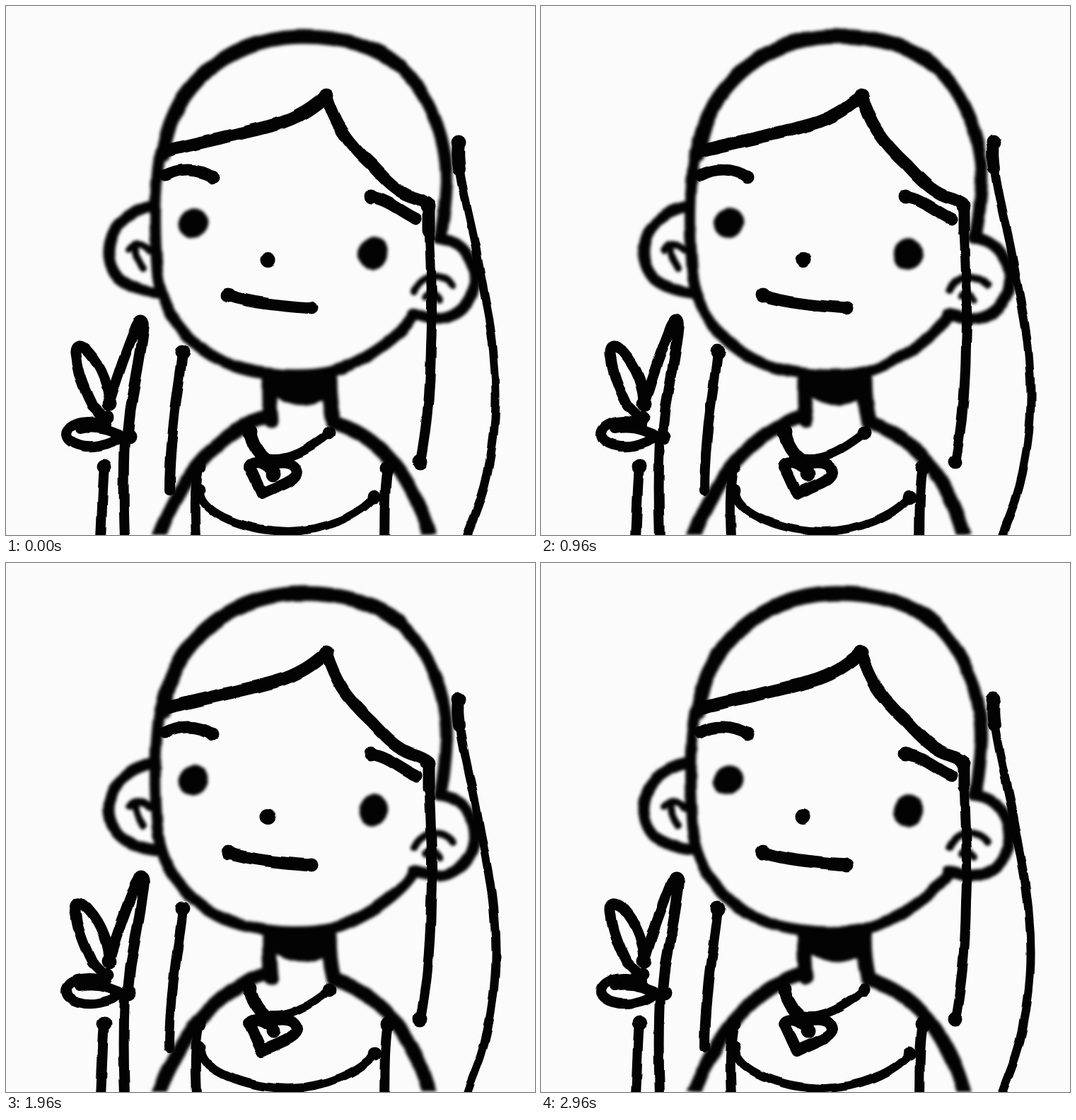
An HTML page that plays this animation: 748 px wide and 748 px high, repeating every 3000 ms.

```html
<!DOCTYPE html>
<html lang="en">
<head>
<meta charset="utf-8">
<title>Boiling line portrait</title>
<style>
  html, body { margin: 0; height: 100%; overflow: hidden; background: #fbfbfb; }
  svg { display: block; width: 100vw; height: 100vh; }
  g { fill: none; stroke: #030303; stroke-linecap: round; stroke-linejoin: round; }
  .solid { fill: #030303; }
</style>
</head>
<body>
<svg viewBox="0 0 748 748">
  <defs>
    <filter id="soft" filterUnits="userSpaceOnUse" x="0" y="0" width="748" height="748" color-interpolation-filters="sRGB">
      <feTurbulence type="fractalNoise" baseFrequency=".035" numOctaves="1"/>
      <feDisplacementMap in="SourceGraphic" scale="6" xChannelSelector="R" yChannelSelector="G"/>
      <feGaussianBlur stdDeviation="2.1"/>
    </filter>
    <filter id="crisp" filterUnits="userSpaceOnUse" x="0" y="0" width="748" height="748" color-interpolation-filters="sRGB">
      <feTurbulence type="fractalNoise" baseFrequency=".035" numOctaves="1"/>
      <feDisplacementMap in="SourceGraphic" scale="6" xChannelSelector="R" yChannelSelector="G"/>
      <feGaussianBlur stdDeviation=".7"/>
    </filter>
  </defs>

  <g filter="url(#soft)" stroke-width="16">
    <!-- head -->
    <path stroke-width="21" d="M222 210C227 180 234 158 251 129C291 73 350 43 420 43C470 43 520 54 557 85"/>
    <path stroke-width="18" d="M557 85C597 122 624 185 623 250C621 290 618 305 615 322"/>
    <path d="M218 208C211 250 209 310 214 375C220 440 265 487 320 508C360 522 420 526 460 517C500 506 550 475 575 440"/>
    <!-- ears -->
    <path d="M208 283C185 287 165 297 152 320C141 345 144 368 160 386C175 398 195 404 216 406"/>
    <path d="M612 328C645 330 663 360 663 388C661 425 630 446 602 442C588 439 582 435 575 436"/>
    <path stroke-width="10" d="M174 345C182 334 194 335 203 346M184 340C182 352 188 362 194 371M577 403C588 380 614 374 632 395M594 411Q603 400 613 416"/>
    <!-- eyes -->
    <ellipse class="solid" stroke="none" cx="265" cy="307" rx="22" ry="20" transform="rotate(-35 265 307)"/>
    <ellipse class="solid" stroke="none" cx="519" cy="350" rx="21" ry="23" transform="rotate(20 519 350)"/>
    <!-- neck and shoulders -->
    <path stroke-width="21" d="M373 528Q372 560 375 586M457 528Q457 560 463 586"/>
    <path class="solid" stroke="none" d="M376 520H460L455 554Q418 576 380 552Z"/>
    <path stroke-width="20" d="M370 580C320 594 272 640 249 682C235 706 223 730 214 754M463 589C510 602 546 637 566 672C585 705 592 725 600 754"/>
  </g>

  <g filter="url(#crisp)" stroke-width="14">
    <!-- fringe and strands -->
    <path stroke-width="18" d="M230 204C270 194 340 179 380 168C415 158 435 143 453 127"/>
    <path stroke-width="17" d="M453 127C465 165 480 190 518 225C537 246 553 262 572 269Q590 274 598 281V318"/>
    <path d="M598 300C600 360 604 420 601 480C600 560 592 610 586 645M250 489C246 530 238 570 236 600C232 640 231 665 231 685"/>
    <path stroke-width="18" d="M640 193Q638 210 641 230"/>
    <path stroke-width="12" d="M641 225C646 265 656 300 665 345C674 400 687 450 690 500C696 560 691 610 681 660C673 700 660 725 651 752"/>
    <!-- brows, mouth, nose -->
    <path stroke-width="17" d="M225 240C245 229 270 229 292 242M516 270C540 273 560 292 580 301"/>
    <path stroke-width="17" d="M314 409Q345 421 432 427"/>
    <circle class="solid" stroke="none" cx="370.5" cy="359" r="11"/>
    <!-- raised hand -->
    <path stroke-width="15" d="M146 566C147 540 135 510 118 491C104 474 95 480 99 498C101 520 112 545 122 565L140 583M148 555C157 525 169 490 184 453C190 440 197 442 195 455C191 490 183 530 176 570L172 609"/>
    <path d="M142 592C110 580 85 592 85 606C87 620 112 626 132 622Q152 618 160 610L174 609M104 598Q125 594 144 600L160 606"/>
    <path d="M168 612C166 660 166 700 168 752M139 651C136 690 136 720 134 752"/>
    <!-- arms, neckline, necklace -->
    <path d="M273 650C267 680 267 710 269 752M540 652C534 690 536 720 535 752"/>
    <path stroke-width="12" d="M275 688C276 718 340 742 400 743C450 742 500 720 521 694M368 639C400 645 430 625 457 604"/>
    <path stroke-width="18" d="M345 603C348 618 354 630 366 640"/>
    <path stroke-width="16" d="M344 651L362 690C380 680 411 673 412 659C410 643 385 642 370 652C358 643 345 645 344 652"/>
    <!-- rounded stroke ends -->
    <path stroke-width="21" d="M453 127h.01M597 283h.01M585 645h.01M640 193h.01M250 489h.01M516 270h.01M314 409h.01M146 563h.01M191 446h.01M174 609h.01M139 651h.01M540 653h.01M345 603h.01M378 662h.01"/>
    <path stroke-width="19" d="M432 427h.01M292 242h.01M273 652h.01M273 685h.01M521 694h.01M457 604h.01M143 582h.01"/>
  </g>
</svg>
<script>
  const LOOP = 3000, STEP = 80;
  const holds = [40, 560, 1560, 2560]; // a pose lasts 40 ms longer around these times
  const noises = document.querySelectorAll('feTurbulence');
  let shown = -1;

  function draw() {
    const t = performance.now() % LOOP;
    const delay = 40 * holds.filter(h => t >= h).length;
    const pose = Math.floor((t - delay) / STEP);
    if (pose !== shown) {
      shown = pose;
      noises.forEach(n => n.setAttribute('seed', pose + 1));
    }
    requestAnimationFrame(draw);
  }
  draw();
</script>
</body>
</html>
```
